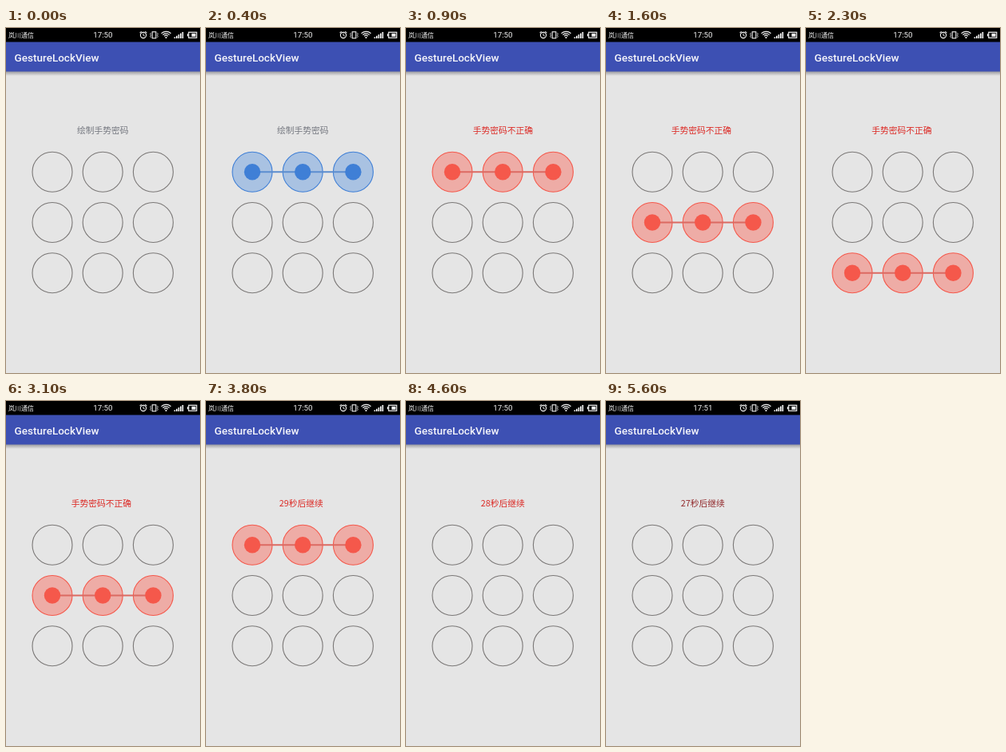
Animation, 243 px wide and 432 px high, one loop 6.1 s. Source, as an HTML page with a canvas:

```html
<!DOCTYPE html>
<html lang="zh">
<head>
<meta charset="utf-8">
<style>
  html, body { margin: 0; width: 100%; height: 100%; overflow: hidden; background: #e5e5e5; }
  canvas { display: block; width: 243px; height: 432px; }
</style>
</head>
<body>
<canvas id="stage"></canvas>
<script>
const W = 243, H = 432, LOOP = 6100, STEP = 100;
const canvas = document.getElementById('stage');
const ctx = canvas.getContext('2d');
const dpr = window.devicePixelRatio || 1;
canvas.width = W * dpr;
canvas.height = H * dpr;
ctx.scale(dpr, dpr);

const CJK = '"Noto Sans CJK SC", "Noto Sans CJK", sans-serif';
const ROBOTO = 'Roboto, sans-serif';
const COLS = [58, 121.2, 184.4], ROWS = [180.2, 243.5, 306.7], RADIUS = 25;
const BLUE = { solid: '#3f7fd6', fill: '#a9c2e2', line: '#5b8dcf' };
const RED = { solid: '#f5584b', fill: '#eeaca6', line: '#dc6a62' };
const SHAKE_MS = 400, CLEAR_AT = 4400;

const attempts = [
  { row: 0, start: 100, fail: 500 },
  { row: 1, start: 1300, fail: 1500 },
  { row: 2, start: 2000, fail: 2250 },
  { row: 1, start: 2700, fail: 3000 },
  { row: 0, start: 3400, fail: 3700 }
];

function text(str, x, y, font, color, align = 'left') {
  ctx.font = font;
  ctx.fillStyle = color;
  ctx.textAlign = align;
  ctx.textBaseline = 'alphabetic';
  ctx.fillText(str, x, y);
}

function rect(x, y, w, h, color) {
  ctx.fillStyle = color;
  ctx.fillRect(x, y, w, h);
}

function circle(x, y, r, fill, stroke, width = 1.1) {
  ctx.beginPath();
  ctx.arc(x, y, r, 0, Math.PI * 2);
  if (fill) { ctx.fillStyle = fill; ctx.fill(); }
  if (stroke) { ctx.strokeStyle = stroke; ctx.lineWidth = width; ctx.stroke(); }
}

function line(points, color, width) {
  ctx.beginPath();
  points.forEach(([x, y]) => ctx.lineTo(x, y));
  ctx.strokeStyle = color;
  ctx.lineWidth = width;
  ctx.stroke();
}

function statusIcons() {
  const white = '#f2f2f2';
  // alarm
  circle(172, 9, 3.6, null, white, 1.1);
  line([[172, 6.8], [172, 9.2], [173.8, 10]], white, 0.9);
  line([[167.6, 6.2], [169.8, 4.3]], white, 1.1);
  line([[176.4, 6.2], [174.2, 4.3]], white, 1.1);
  // vibrate
  ctx.strokeStyle = white;
  ctx.lineWidth = 1.1;
  ctx.strokeRect(183.2, 4.8, 4.6, 8);
  for (const side of [-1, 1]) {
    line([[185.5 + side * 4, 6], [185.5 + side * 4.8, 7.5], [185.5 + side * 4, 9], [185.5 + side * 4.8, 10.5], [185.5 + side * 4, 12]], white, 0.8);
  }
  // wifi
  for (const r of [3.2, 5.7, 8.2]) {
    ctx.beginPath();
    ctx.arc(200.5, 12.5, r, -Math.PI * 0.76, -Math.PI * 0.24);
    ctx.lineWidth = 1.2;
    ctx.stroke();
  }
  circle(200.5, 12, 1.1, white);
  // signal
  for (let i = 0; i < 5; i++) {
    const h = 1.6 + i * 1.6;
    rect(210.5 + i * 2.5, 13 - h, 1.7, h, white);
  }
  // battery
  ctx.strokeRect(228.8, 5.3, 10, 7);
  rect(227, 7.3, 1.5, 3, white);
  rect(232.5, 6.8, 5, 4, white);
}

function chrome(t) {
  rect(0, 0, W, H, '#e5e5e5');
  const shadow = ctx.createLinearGradient(0, 54, 0, 60);
  shadow.addColorStop(0, 'rgba(70,70,80,.5)');
  shadow.addColorStop(1, 'rgba(70,70,80,0)');
  rect(0, 54, W, 6, shadow);
  rect(0, 17, W, 37.5, '#3d50b3');
  rect(0, 0, W, 17.5, '#000');
  text('岚川通信', 3, 11.6, `8px ${CJK}`, '#f2f2f2');
  text(t < 5100 ? '17:50' : '17:51', 121.3, 12.4, `9.7px ${ROBOTO}`, '#f2f2f2', 'center');
  statusIcons();
  text('GestureLockView', 10.6, 41.5, `500 13.5px ${ROBOTO}`, '#f5f5fa');
}

function message(t) {
  const failed = attempts.filter(a => t >= a.fail);
  let str = '绘制手势密码', color = '#74777f', dx = 0;
  if (failed.length) {
    const age = t - failed[failed.length - 1].fail;
    str = '手势密码不正确';
    color = '#dc2a25';
    if (age < SHAKE_MS) dx = -2 * Math.sin(2 * Math.PI * age / SHAKE_MS);
  }
  if (failed.length === attempts.length) {
    const seconds = t < 4600 ? 29 : t < 5600 ? 28 : 27;
    str = `${seconds}秒后继续`;
    if (seconds === 27) color = '#922a2c';
  }
  text(str, 121.3 + dx, 132.4, `10.75px ${CJK}`, color, 'center');
}

function lock(t) {
  const current = t < CLEAR_AT ? attempts.filter(a => t >= a.start).pop() : null;
  let reached = 0, finger = 0, theme = RED;
  if (current) {
    const dragging = t < current.fail;
    const p = Math.min(1, (t - current.start) / (current.fail - current.start - 50));
    finger = 52 + 140 * p;
    reached = dragging ? COLS.filter(x => finger >= x - RADIUS).length : 3;
    theme = dragging ? BLUE : RED;
    if (!dragging) finger = 0;
  }
  ROWS.forEach((y, r) => COLS.forEach((x, c) => {
    const on = current && r === current.row && c < reached;
    circle(x, y, RADIUS, on ? theme.fill : null, on ? theme.solid : '#7b7877');
  }));
  if (!reached) return;
  const y = ROWS[current.row], last = COLS[reached - 1];
  line([[COLS[0], y], [Math.max(last, finger), y]], theme.line, 2);
  COLS.slice(0, reached).forEach(x => circle(x, y, 10.2, theme.solid));
}

function draw(now) {
  const t = Math.floor((now % LOOP) / STEP) * STEP;
  chrome(t);
  message(t);
  lock(t);
}

const origin = performance.now();
function tick() {
  draw(performance.now() - origin);
  requestAnimationFrame(tick);
}
tick();
</script>
</body>
</html>
```
